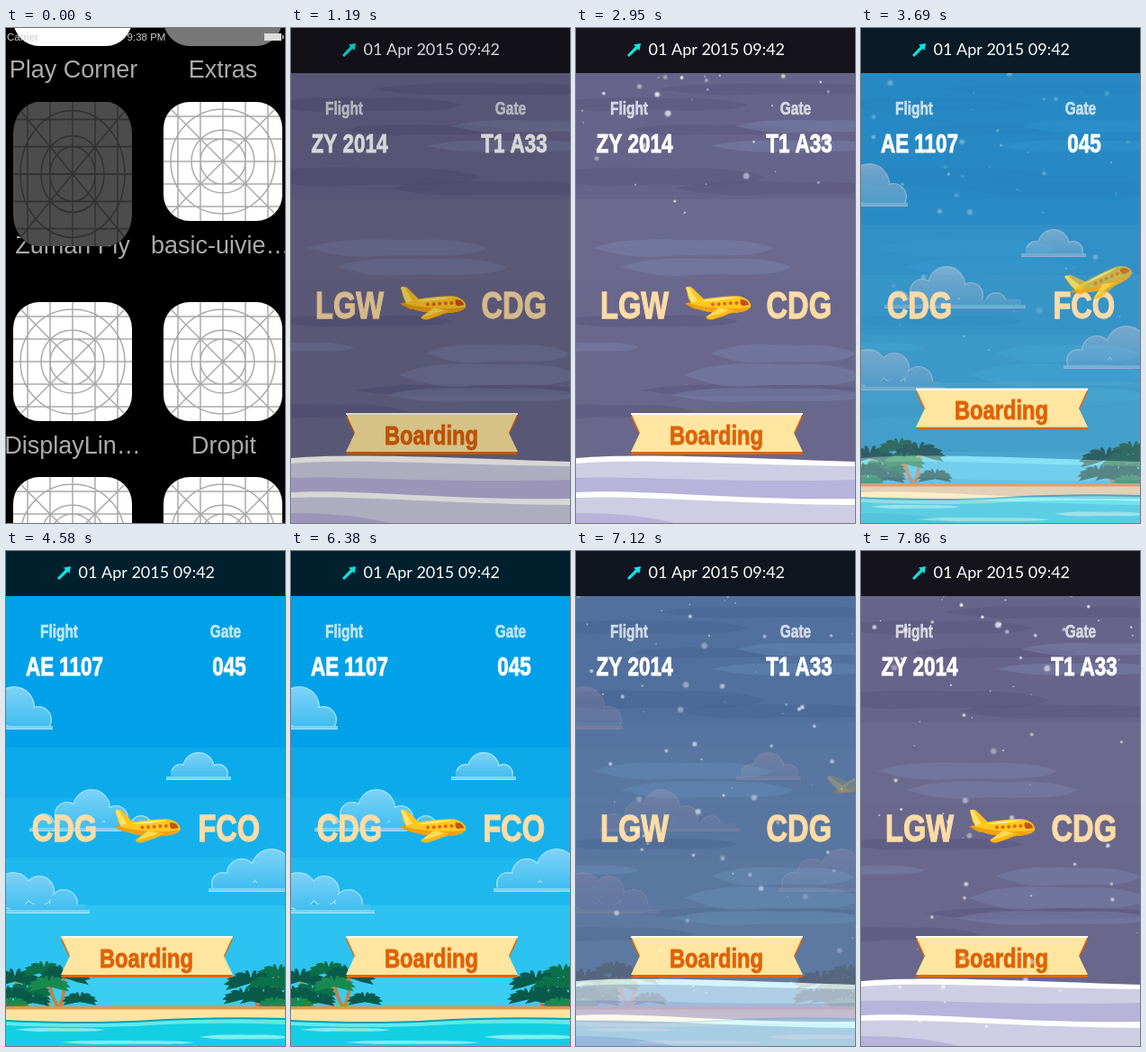
An HTML page with a canvas that plays this animation: 310x549 px, repeating every 8 s.

```html
<!DOCTYPE html>
<html lang="en">
<head>
<meta charset="utf-8">
<title>Flight board</title>
<style>
  html, body { margin: 0; width: 100%; height: 100%; overflow: hidden; background: #000; }
  canvas { display: block; width: 100%; height: 100%; }
</style>
</head>
<body>
<canvas id="stage" width="310" height="549"></canvas>
<script>
const W = 310, H = 549, LOOP = 8000;
const TO_DAY = 3115, TO_NIGHT = 6405, SNOW_START = 1250;
const SANS = '"Liberation Sans", Arial, sans-serif';
const CONDENSED = 0.78; // the labels use a condensed bold face
const FLIGHTS = {
  night: { number: 'ZY 2014', gate: 'T1 A33', from: 'LGW', to: 'CDG' },
  day: { number: 'AE 1107', gate: '045', from: 'CDG', to: 'FCO' }
};

const screen = document.getElementById('stage').getContext('2d');
let ctx = screen;

const clamp = v => Math.min(1, Math.max(0, v));
const span = (v, a, b) => clamp((v - a) / (b - a));
const lerp = (a, b, p) => a + (b - a) * p;
const smooth = v => { const p = clamp(v); return p * p * (3 - 2 * p); };
const easeOut = v => 1 - (1 - clamp(v)) ** 3;
const random = n => { const v = Math.sin(n * 127.1 + 31.7) * 43758.5453; return v - Math.floor(v); };

function rect(x, y, w, h, color) {
  ctx.fillStyle = color;
  ctx.fillRect(x, y, w, h);
}
function shape(d, color) {
  ctx.fillStyle = color;
  ctx.fill(new Path2D(d));
}
function dot(x, y, r, color) {
  ctx.fillStyle = color;
  ctx.beginPath();
  ctx.arc(x, y, r, 0, 7);
  ctx.fill();
}
function group(draw, { x = 0, y = 0, sx = 1, sy = 1, turn = 0, alpha = 1 } = {}) {
  ctx.save();
  ctx.translate(x, y);
  ctx.rotate(turn);
  ctx.scale(sx, sy);
  ctx.globalAlpha *= alpha;
  draw();
  ctx.restore();
}
function text(str, x, y, font, color, align = 'center') {
  ctx.font = font;
  ctx.fillStyle = color;
  ctx.textAlign = align;
  ctx.fillText(str, x, y);
}
function label(str, x, y, size, color, { dx = 0, dy = 0, sx = 1, sy = 1, alpha = 1, heavy = true } = {}) {
  const half = size * 0.36;
  group(() => {
    text(str, 0, half, `${heavy ? 'bold' : 'normal'} ${size}px ${SANS}`, color);
    if (!heavy) return;
    ctx.strokeStyle = color;
    ctx.lineWidth = size * 0.03;
    ctx.strokeText(str, 0, half);
  }, { x: x + dx, y: y - half + dy, sx: sx * CONDENSED, sy, alpha });
}
function prerender(draw) {
  const canvas = document.createElement('canvas');
  canvas.width = W;
  canvas.height = H;
  ctx = canvas.getContext('2d');
  draw();
  ctx = screen;
  return canvas;
}

// ---- Scenery ----
function streak(x, y, w, h, color) {
  shape(`M${x} ${y} C${x + w * .2} ${y - h},${x + w * .5} ${y - h * .5},${x + w * .65} ${y - h * .6}
    S${x + w * .95} ${y - h * .3},${x + w} ${y} C${x + w * .9} ${y + h * .9},${x + w * .6} ${y + h * .4},${x + w * .4} ${y + h * .6}
    S${x + w * .1} ${y + h * .3},${x} ${y}Z`, color);
}

const nightScene = prerender(() => {
  rect(0, 0, W, H, '#6c698f');
  rect(0, 0, W, 190, '#67648b');
  rect(0, 279, W, 200, '#6a678d');
  for (const [x, y, w, h] of [[-30, 85, 220, 12], [90, 68, 260, 10], [60, 113, 180, 9],
    [-40, 165, 250, 16], [110, 178, 230, 12], [-20, 325, 200, 10], [70, 402, 260, 10], [-60, 425, 190, 12]])
    streak(x, y, w, h, 'rgba(88,83,122,.45)');
  for (const [x, y, w, h] of [[178, 109, 170, 11], [150, 131, 190, 10], [18, 244, 200, 15],
    [50, 265, 190, 15], [150, 361, 160, 16], [120, 385, 200, 20], [105, 407, 220, 12], [-40, 354, 110, 8]])
    streak(x, y, w, h, 'rgba(122,134,170,.45)');
  shape('M0 477 C70 471 190 477 310 481 V549 H0Z', '#fff');
  shape('M0 483 C70 477 190 485 310 486 V549 H0Z', '#cfcde3');
  shape('M0 499 C60 496 170 505 310 501 V549 H0Z', '#b8b3db');
  shape('M0 515 C70 511 180 524 310 522 V549 H0Z', '#fff');
  shape('M0 521 C70 518 180 528 310 529 V549 H0Z', '#cfcde3');
  shape('M0 538 Q60 537 110 549 H0Z', '#b8b3db');
});

// A cloud is a pale union of puffs with a slightly smaller blue one inside.
function cloud(left, right, base, puffs) {
  const top = Math.min(...puffs.map(([, y, r]) => y - r));
  const fill = ctx.createLinearGradient(0, top, 0, base);
  fill.addColorStop(0, '#7fd3f7');
  fill.addColorStop(1, '#3bbcf0');
  ctx.save();
  ctx.beginPath();
  ctx.rect(left, top, right - left, base - top);
  ctx.clip();
  for (const [inset, color] of [[0, '#a2e1fa'], [1.3, fill]]) {
    ctx.beginPath();
    for (const [x, y, r] of puffs) {
      ctx.moveTo(x + r - inset, y);
      ctx.arc(x, y, r - inset, 0, 7);
    }
    ctx.rect(left + 5, base - 10, right - left - 10, 10);
    ctx.fillStyle = color;
    ctx.fill();
  }
  ctx.restore();
  rect(left, base - 4, right - left, 4, '#7ad3f6');
  rect(left, base - 1, right - left, 1, '#a2e1fa');
}

function palm(x, y, size, color, trunkX) {
  if (trunkX) {
    ctx.strokeStyle = '#b9854c';
    ctx.lineWidth = 4;
    ctx.beginPath();
    ctx.moveTo(x, y);
    ctx.quadraticCurveTo(x + 3, y + 18, trunkX, 506);
    ctx.stroke();
  }
  for (let i = 0; i < 10; i++) {
    const angle = Math.PI * (1.12 - i * 0.138);
    const tipX = x + Math.cos(angle) * size;
    const tipY = y - Math.sin(angle) * size * .5 + size * .25;
    const midX = (x + tipX) / 2, midY = Math.min(y, tipY) - size * .2;
    shape(`M${x} ${y} Q${midX} ${midY} ${tipX} ${tipY} Q${midX} ${midY + size * .55} ${x} ${y + 5}Z`, color);
  }
}

const dayScene = prerender(() => {
  [[0, '#00a1e8'], [218, '#0caaeb'], [274, '#16b1ed'], [340, '#1eb8ee'], [393, '#2cc3f0'], [470, '#3acdf2']]
    .forEach(([y, color]) => rect(0, y, W, H - y, color));
  cloud(0, 52, 198, [[9, 173, 23], [36, 187, 15]]);
  cloud(178, 250, 254, [[214, 241, 18], [194, 247, 11], [236, 247, 11]]);
  cloud(26, 183, 311, [[68, 292, 14], [122, 296, 14], [95, 285, 21], [42, 303, 12], [150, 305, 12]]);
  cloud(225, 320, 378, [[262, 358, 17], [295, 353, 23], [241, 369, 13], [322, 356, 20]]);
  cloud(0, 93, 402, [[37, 377, 17], [8, 377, 21], [64, 391, 16]]);
  const green = ['#0a5a4b', '#0c7049', '#188a50'];
  palm(10, 472, 30, green[0], 18);
  palm(42, 462, 24, green[1], 46);
  palm(24, 486, 28, green[1]);
  palm(6, 490, 26, green[0]);
  palm(64, 468, 30, green[0], 60);
  palm(48, 478, 24, green[2], 58);
  palm(82, 495, 20, green[0]);
  palm(30, 496, 20, green[0]);
  palm(8, 500, 18, green[2]);
  palm(302, 466, 26, green[1], 300);
  palm(272, 474, 30, green[0], 280);
  palm(296, 478, 30, green[1], 290);
  palm(264, 492, 24, green[0]);
  palm(286, 490, 28, green[0]);
  palm(308, 492, 28, green[0]);
  palm(298, 500, 18, green[2]);
  rect(0, 505, W, 44, '#d99a45');
  shape('M0 508.5 H310 V549 H0Z', '#fde3a2');
  shape('M0 520 Q90 524 160 520 T310 518 V549 H0Z', '#0b9fae');
  shape('M0 522 Q90 526 160 522 T310 520 V549 H0Z', '#5fe9ee');
  shape('M0 526 Q90 530 160 526 T310 525 V549 H0Z', '#12cfe4');
  streak(10, 531, 100, 3, '#7ceef0');
  streak(60, 545, 150, 3, '#7ceef0');
  streak(215, 539, 100, 4, '#7ceef0');
});

// ---- Moving parts ----
function drawPlane() {
  ctx.translate(0, 2);
  ctx.rotate(.12);
  shape('M-36 3 L-29 0 L-14 5 L-24 8Z', '#e8960c');
  shape('M-37 -15 Q-32 -18 -28 -14 L-14 -3 L-24 5 Q-31 0 -33 -4Z', '#ffc21e');
  shape('M-37 -15 Q-34 -17 -32 -14 L-22 -1 L-29 1Z', '#ffe468');
  shape('M-30 2 C-20 -5 0 -9 18 -12 C30 -14 38 -7 37 -2 C34 5 16 8 0 9 C-14 9 -26 7 -30 2Z', '#ffc81f');
  shape('M-30 2 C-14 5 18 4 37 -2 C34 5 16 8 0 9 C-14 9 -26 7 -30 2Z', '#f2a012');
  shape('M-18 -2 C-4 -7 10 -10 22 -11 C10 -7 -6 -3 -18 -2Z', '#ffec86');
  shape('M25 -9 Q33 -10 35 -4 L28 -2 Q24 -4 25 -9Z', '#c8501a');
  for (let i = 0; i < 5; i++) dot(-5 + i * 6.5, 0.2 - i * 1.2, 2, '#e0641a');
  shape('M2 3 L20 4 Q10 12 -4 17 Q-10 18 -11 15 Q-4 9 2 3Z', '#ffb914');
  shape('M2 3 L14 4 Q4 10 -10 15 Q-4 9 2 3Z', '#ffdc50');
}

function planePose(e) {
  const p = smooth(e / 1.5);
  if (p < 0.51) {
    const roll = span(p, 0, .25), climb = span(p, .25, .5);
    return {
      x: 157 + 77.5 * roll + 97 * climb, y: 305 - 10 * roll - 48 * climb,
      turn: -Math.PI / 8 * span(p, .1, .35), alpha: 1 - climb
    };
  }
  const arrive = span(p, .55, 1);
  return { x: 157 * arrive, y: 305, alpha: arrive };
}

function drawRibbon(e) {
  const entering = e >= 0.1;
  const x = entering ? -302 * (1 - span(e, .1, .42)) : 0;
  const y = entering ? -50 * (1 - span(e, .5, .665)) : 0;
  group(() => {
    shape('M61 431 H252 L242 452 L252 473 H61 L71 452Z', '#e06508');
    shape('M61 427 H252 L242 449 L252 470 H61 L71 449Z', '#ffe6a0');
    rect(61, 427, 191, 2, '#fffdf2');
    label('Boarding', 156, 461.5, 30.4, '#df6207');
  }, { x, y });
}

function flip(before, after, x, e, dir) {
  const p = easeOut(e / .77 + Math.max(0, e - .35) * 3);
  if (p < .9) label(before, x, 138, 28.8, '#fff', { sx: 1 - .45 * p, sy: 1 - .9 * p, dy: -14 * p * dir });
  label(after, x, 138, 28.8, '#fff', {
    sx: Math.min(1, p + .03), sy: .1 + .9 * p ** 3, dy: 8 * (1 - p) * dir,
    alpha: span(p, .05, .4), heavy: p > .9
  });
}

function slide(before, after, x, offsetX, offsetY, e) {
  const out = span(e, 0, .34), back = span(e, .3, .58);
  const away = 1 - easeOut(back);
  label(before, x, 322, 41.8, '#fedca6', { dx: offsetX * out, dy: offsetY * out, alpha: 1 - out });
  label(after, x, 322, 41.8, '#fedca6', { dx: offsetX * away, dy: offsetY * away, alpha: back });
}

function drawSnow(t, visibility) {
  if (visibility <= 0) return;
  ctx.save();
  ctx.beginPath();
  ctx.rect(0, 50, W, H - 50);
  ctx.clip();
  const rate = 45, now = (t - SNOW_START) / 1000;
  for (let i = Math.max(0, Math.floor((now - 4.2) * rate)); i < now * rate; i++) {
    const age = now - i / rate;
    const rnd = k => random(i * 6 + k);
    const x = lerp(-60, 370, rnd(0)) + lerp(-60, 50, rnd(1)) * age + 5 * age * age;
    const y = -50 * rnd(2) + lerp(-30, 100, rnd(3)) * age + 34 * age * age;
    const size = (1 + 4 * rnd(4) ** 1.6) * (1 - age * .06);
    ctx.globalAlpha = visibility * clamp(1 - age * .12) * lerp(.4, 1, rnd(5));
    dot(x, y, size, 'rgba(255,255,255,.4)');
    dot(x, y, size * .65, 'rgba(255,255,255,.85)');
  }
  ctx.restore();
}

function drawApp(t) {
  const day = smooth((t - TO_DAY) / 1000) - smooth((t - TO_NIGHT) / 1000);
  const landing = t >= TO_NIGHT;
  const e = landing ? (t - TO_NIGHT) / 1000 : t >= TO_DAY ? (t - TO_DAY) / 1000 : 9;
  const toDay = t >= TO_DAY && !landing;
  const after = toDay ? FLIGHTS.day : FLIGHTS.night;
  const before = toDay ? FLIGHTS.night : FLIGHTS.day;
  const dir = toDay ? -1 : 1;

  ctx.drawImage(nightScene, 0, 0);
  group(() => ctx.drawImage(dayScene, 0, 0), { alpha: day });
  rect(0, 0, W, 50, 'rgba(0,0,0,.8)');
  shape('M57 30 L66 20.5 L64 18.5 L72 17 L70.5 25 L68.5 23 L59 32Z', '#0fe3e3');
  text('01 Apr 2015 09:42', 80.5, 30, '18px Lato, sans-serif', '#fff', 'left');

  label('Flight', 59, 96, 19.8, '#fff', { alpha: .72 });
  label('Gate', 244, 96, 19.8, '#fff', { alpha: .72 });
  flip(before.number, after.number, 65, e, dir);
  flip(before.gate, after.gate, 248, e, dir);
  slide(before.from, after.from, 65, 77.5 * dir, 0, e);
  slide(before.to, after.to, 247.8, 0, -48.5 * dir, e);
  group(drawPlane, planePose(e));
  drawRibbon(e);
  drawSnow(t, 1 - day);
}

// ---- Home screen ----
function drawTile(x, y, w = 132, h = 132) {
  group(() => {
    ctx.beginPath();
    ctx.roundRect(0, 0, 132, 132, 29);
    ctx.fillStyle = '#fff';
    ctx.fill();
    ctx.save();
    ctx.clip();
    ctx.strokeStyle = '#aaa';
    ctx.lineWidth = 1.5;
    ctx.beginPath();
    for (const c of [16, 41, 66, 91, 116]) {
      ctx.moveTo(c, 0); ctx.lineTo(c, 132);
      ctx.moveTo(0, c); ctx.lineTo(132, c);
    }
    ctx.moveTo(0, 0); ctx.lineTo(132, 132);
    ctx.moveTo(132, 0); ctx.lineTo(0, 132);
    for (const r of [25, 35, 58]) {
      ctx.moveTo(66 + r, 66);
      ctx.arc(66, 66, r, 0, 7);
    }
    ctx.stroke();
    ctx.restore();
  }, { x, y, sx: w / 132, sy: h / 132 });
}

function drawStatus() {
  const font = `11.5px ${SANS}`;
  text('Carrier', 1, 14, font, '#ccc', 'left');
  text('9:38 PM', 156, 14, font, '#ccc');
  rect(287, 6, 19, 8, '#ddd');
  rect(307, 8, 1.5, 4, '#ddd');
}

function drawHome(p) {
  const box = { x: lerp(8, 0, p), y: lerp(82, 0, p), w: lerp(132, W, p), h: lerp(160, H, p) };
  const zoom = box.w / 132;
  group(() => {
    ctx.fillStyle = '#fff';
    ctx.beginPath(); ctx.roundRect(8, -112, 132, 132, 29); ctx.fill();
    ctx.fillStyle = '#787878';
    ctx.beginPath(); ctx.roundRect(175, -112, 132, 132, 29); ctx.fill();
    for (const [x, y] of [[175, 82], [8, 304], [175, 304], [8, 498], [175, 498]]) drawTile(x, y);
    const font = `27px ${SANS}`, grey = '#aaa';
    text('Play Corner', 75, 55, font, grey);
    text('Extras', 241, 55, font, grey);
    text('Zumari Fly', 74, 250, font, grey);
    text('basic-uivie…', 161, 250, font, grey, 'left');
    text('DisplayLin…', 74, 472, font, grey);
    text('Dropit', 242, 472, font, grey);
  }, { x: box.x - 8 * zoom, y: box.y + box.h / 2 - 162 * zoom, sx: zoom, sy: zoom });
  drawTile(box.x, box.y, box.w, box.h);
  ctx.beginPath();
  ctx.roundRect(box.x, box.y, box.w, box.h, 29 * (1 - p));
  ctx.fillStyle = `rgba(0,0,0,${lerp(.7, 1, p)})`;
  ctx.fill();
}

// The picture advances in steps of about 148 ms.
function stepTime(t) {
  if (t < 4580) return Math.floor((t + 6) / 147.6) * 147.6;
  if (t < 6380) return 4580;
  return 6380 + Math.floor((t - 6374) / 147.8) * 147.8;
}

function draw(now) {
  const t = stepTime(now % LOOP);
  rect(0, 0, W, H, '#000');
  if (t < 290) drawHome(t > 0 ? .8 : 0);
  if (t < 1030) {
    drawStatus();
  } else {
    group(() => drawApp(t));
    rect(0, 0, W, H, `rgba(0,0,0,${1 - easeOut((t - 930) / 550)})`);
  }
}

const start = performance.now();
function tick() {
  draw(performance.now() - start);
  requestAnimationFrame(tick);
}
tick();
</script>
</body>
</html>
```
